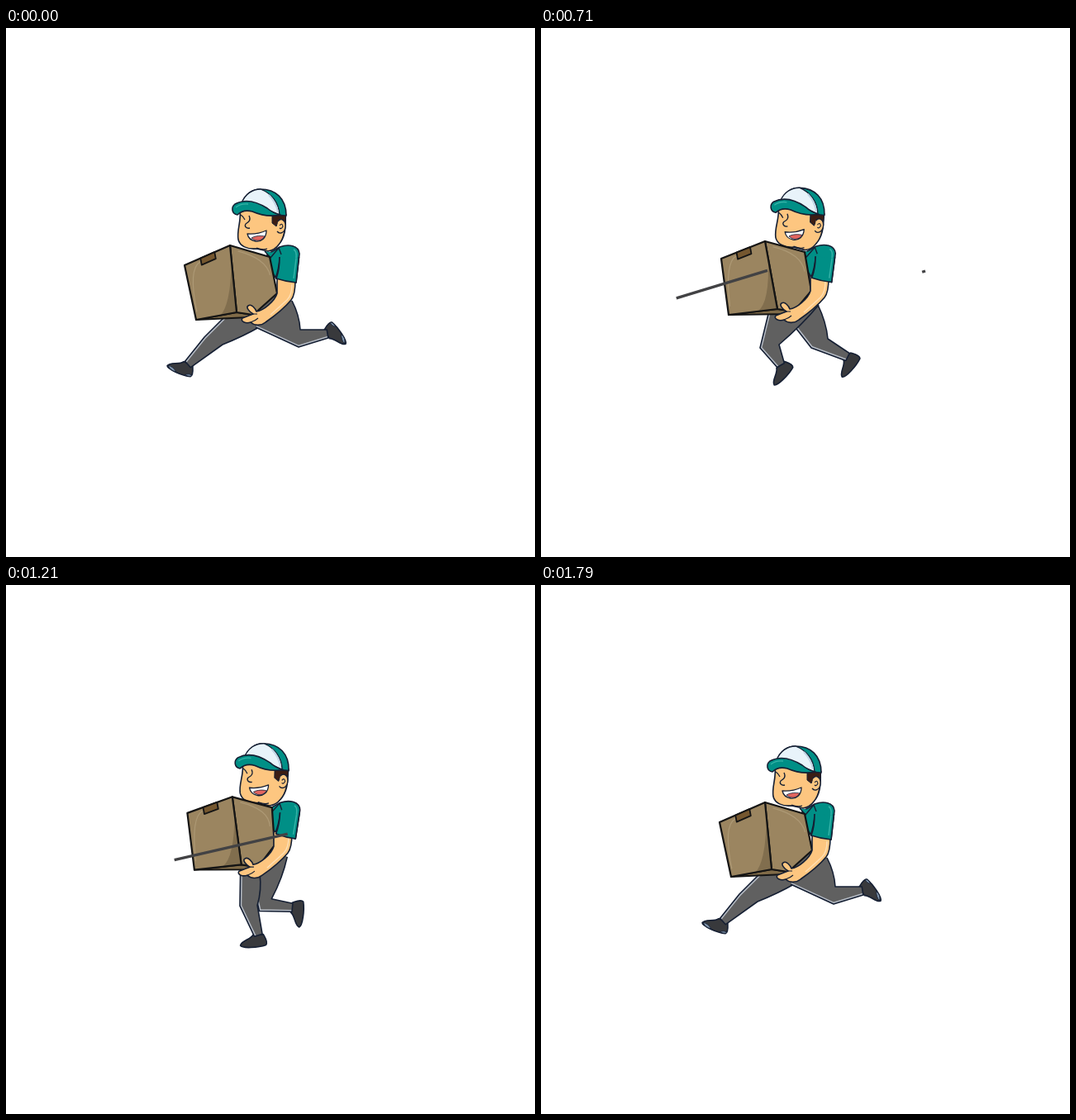
Write an HTML page with a canvas that moves like this. It is 640x640 px and loops after 1.87 s.

```html
<!DOCTYPE html>
<html lang="en">
<head>
<meta charset="utf-8">
<title>Running courier</title>
<style>
html, body { margin: 0; width: 100%; height: 100%; overflow: hidden; background: #fff; }
canvas { display: block; width: 640px; height: 640px; }
</style>
</head>
<body>
<canvas id="stage" width="640" height="640"></canvas>
<script>
const ctx = document.getElementById("stage").getContext("2d");
const LOOP = 1870, FPS = 14, CYCLE = 25;
const INK = "#151f33", BLACK = "#141414", TEAL = "#008f86", SKIN = "#fdc680",
      PANTS = "#606060", SHINE = "#b4bac3", SHOE = "#38393c", CARD = "#9b8560";

// Leg poses: phase, hip front, knee front, ankle, knee back, hip back (x, y each), shoe angle
const stance = [
  [0, 265,349, 240,374, 220,407, 262,383, 306,362, 25],
  [2.5, 278,346, 274,384, 286,421, 295,384, 338,336, 10],
  [4, 281,350, 278,388, 297,424, 299,388, 305,352, 0],
  [7, 295,350, 312,393, 339,417, 329,388, 322,350, -13],
  [7.5, 301,352, 318,387, 361,418, 340,381, 342,324, -8],
  [10, 306,360, 327,387, 371,398, 347,376, 335,335, -46],
];
const swing = [
  [12.5, 302,362, 354,386, 389,370, 356,365, 346,330, -122],
  [15, 309,368, 331,394, 367,369, 340,372, 333,336, -125],
  [16.5, 298,350, 311,395, 353,386, 325,378, 344,326, -92],
  [19.5, 287,350, 291,394, 341,397, 311,380, 343,325, -80],
  [20, 283,350, 284,390, 305,411, 302,388, 308,355, -19],
  [22.5, 275,346, 265,387, 290,408, 288,383, 336,335, -43],
];
const legPoses = [...stance, ...swing];
const farLeg = legPoses.filter(p => p[0] !== 7.5 && p[0] !== 19.5);
const nearLeg = legPoses.filter(p => p[0] !== 7 && p[0] !== 20);

// Box corners: phase, top, left, bottom left, bottom middle, right, bottom right
const boxPoses = [
  [0, 271,263, 216,287, 230,353, 279,344, 319,277, 328,321],
  [4, 268,257, 214,280, 228,347, 281,338, 316,270, 327,317],
  [7, 268,255, 214,278, 227,346, 282,337, 316,268, 326,316],
  [10, 271,258, 218,279, 227,347, 286,340, 319,271, 327,318],
  [12.5, 273,259, 219,279, 228,348, 287,341, 321,272, 327,319],
  [15, 274,258, 220,277, 228,346, 287,340, 322,271, 326,317],
  [20, 273,255, 218,276, 228,344, 281,337, 321,268, 324,313],
];
// Hand: phase, x, y
const handPoses = [[0, 0,0], [4, -1,-5], [7, -2,-6], [10, -2,-3], [15, -3,-3], [20, -5,-7]];

// Speed lines: start point, end point, first step
const speedLines = [
  [170,389, 465,294, 0],
  [137,335, 416,250, 6],
  [107,355, 419,283, 11.55],
];

// Smooth cyclic interpolation through a list of poses
function poseAt(poses, phase) {
  const n = poses.length;
  phase = (phase % CYCLE + CYCLE) % CYCLE;
  let i = n - 1;
  while (poses[i][0] > phase) i--;
  const key = k => poses[(k + n) % n];
  const time = k => key(k)[0] + CYCLE * Math.floor(k / n);
  const span = time(i + 1) - time(i), u = (phase - time(i)) / span;
  const slope = (k, j) => (key(k + 1)[j] - key(k - 1)[j]) / (time(k + 1) - time(k - 1));
  return key(i).map((_, j) => {
    const a = key(i)[j], b = key(i + 1)[j];
    return a + (b - a) * u * u * (3 - 2 * u)
      + span * u * (1 - u) * (slope(i, j) * (1 - u) - slope(i + 1, j) * u);
  }).slice(1);
}

const pairs = list => list.slice(0, list.length & ~1)
  .reduce((out, v, i) => (i % 2 ? out[out.length - 1].push(v) : out.push([v]), out), []);
const mix = (a, b, u) => [a[0] + (b[0] - a[0]) * u, a[1] + (b[1] - a[1]) * u];
const add = (p, x, y) => [p[0] + x, p[1] + y];
const smooth = u => { u = Math.min(1, Math.max(0, u)); return u * u * (3 - 2 * u); };

function paint(path, fill, stroke, width = 1.6) {
  if (typeof path === "string") path = new Path2D(path);
  if (fill) { ctx.fillStyle = fill; ctx.fill(path); }
  if (stroke) { ctx.strokeStyle = stroke; ctx.lineWidth = width; ctx.stroke(path); }
}
const poly = (points, closed = true) => new Path2D("M" + points.join("L") + (closed ? "Z" : ""));

function placed(x, y, angle, px, py, draw) {
  ctx.save();
  ctx.translate(px + x, py + y);
  ctx.rotate(angle);
  ctx.translate(-px, -py);
  draw();
  ctx.restore();
}

function drawLeg(poses, phase) {
  const pose = poseAt(poses, phase), angle = pose[10];
  const [hipF, kneeF, ankle, kneeB, hipB] = pairs(pose.slice(0, 10));
  const knee = mix(kneeF, kneeB, .5);
  const dx = ankle[0] - knee[0], dy = ankle[1] - knee[1], k = 5 / Math.hypot(dx, dy);
  const ankleF = add(ankle, -dy * k, dx * k), ankleB = add(ankle, dy * k, -dx * k);
  const bulge = add(mix(kneeB, hipB, .5), 4, 0);

  placed(ankle[0], ankle[1], angle * Math.PI / 180, 0, 0, () => {
    paint("M-6-1C-9 5-21 6-22 12C-20 16 0 15 9 12C12 9 8 3 6-1Z", SHOE, INK);
    if (Math.abs(phase % CYCLE) < 1.5 || angle < -100)
      paint("M-21 11Q-15 10-9 14Q-17 16-21 11ZM2 13Q6 9 10 10Q9 13 2 13Z", "#8296ad", INK, .8);
  });
  const edge = `M${hipF}L${kneeF}L${ankleF}L${ankleB}L${kneeB}Q${bulge} ${hipB}`;
  const body = new Path2D(edge + "L322,318Z");
  paint(body, PANTS);
  ctx.save();
  ctx.clip(body);
  paint(poly([hipF, kneeF, ankleF], false), null, SHINE, 4.6);
  ctx.restore();
  paint(edge, null, INK);
}

function drawTorso() {
  paint("M316 274L331 265C342 261 354 263 355 273L351 308L327 303L318 290Z", TEAL, INK);
  paint("M331 277Q330 292 326 302", null, INK, 1.3);
  paint("M348 268Q352 270 351 278L348 303", null, "#35b3a8", 1.5);
  paint("M313 270L320 278L330 266L333 274", TEAL, INK, 1.4);
}

function drawHead() {
  paint("M283 219C285 235 279 243 281 256C283 264 292 268 303 267L317 270Q325 269 330 262C337 254 339 243 338 225Z", SKIN, INK);
  paint("M322 226L339 225L338 234L330 232L327 240L322 236Z", "#3c1d14", INK, 1);
  paint("M329 234C333 229 339 233 338 241C337 248 331 250 328 246", SKIN, INK, 1.3);
  paint("M331 239Q334 235 335 240Q333 244 331 242", null, INK, 1.1);
  paint("M294 227C297 233 293 235 290 237C288 240 291 243 295 242M284 226Q287 228 289 232", null, INK, 1.3);
  paint("M292 249Q304 250 315 245C315 254 309 259 302 258C296 257 293 254 292 249Z", "#fff", INK, 1.3);
  paint("M297 254C302 251 309 251 313 252C309 258 303 259 297 254Z", "#e2655f", INK, .8);
  paint("M303 266Q311 269 316 267", null, INK, 1.2);
  paint("M285 213C289 201 298 195 308 195C326 195 339 206 339 227L325 226Z", TEAL, INK);
  paint("M285 212C289 201 298 195 308 195C321 200 330 211 331 226L310 217Z", "#e8f3fa", INK, 1.3);
  paint("M318 202Q327 211 329 223", null, "#bfd5e5", 2);
  paint("M280 226C273 225 272 217 277 213C290 206 305 211 316 218Q323 224 332 226C318 229 307 226 298 222Q287 219 280 226Z", TEAL, INK);
  paint("M278 217Q284 212 293 213", null, "#35b3a8", 1.3);
}

function drawBox(phase) {
  const [top, left, low, mid, right, lowR] = pairs(poseAt(boxPoses, phase));
  const under = add(mid, 20, 3);
  paint(poly([low, mid, under, add(mid, 15, 6)]), "#806b48", BLACK, 2);
  paint(poly([top, right, lowR, under, mid]), CARD, BLACK, 2.2);
  const face = poly([top, left, low, mid]);
  paint(face, CARD);
  const fold = mix(top, mid, .8);
  paint(`M${top}L${mid}L${mix(mid, low, .4)}Q${add(fold, -6, 8)} ${mix(top, mid, .25)}Z`, "#816e4e");
  paint(`M${add(mix(left, low, .85), 3, 0)}Q${add(left, 4, 4)} ${add(mix(left, top, .35), 0, 4)}`, null, "#ad9975", 1.2);
  paint(`M${add(mix(top, right, .2), 0, 4)}Q${add(right, -4, 2)} ${add(mix(right, lowR, .5), -4, 0)}`, null, "#ad9975", 1.2);
  paint(face, null, BLACK, 2.2);
  const tapeL = mix(left, top, .35), tapeR = mix(left, top, .66);
  paint(poly([tapeL, tapeR, add(tapeR, 1.5, 8), add(tapeL, 1.5, 8)]), "#75572f", BLACK, 1.8);
}

function drawArm() {
  paint("M328 303L350 305C350 316 349 324 345 329C335 341 324 349 314 356C308 361 300 360 296 356C290 358 283 355 286 351C291 349 296 347 299 346C294 343 290 338 293 336C297 333 302 340 303 343C311 342 325 331 328 321Z", SKIN, INK);
  paint("M296 356Q302 354 305 351M299 346L304 346", null, INK, 1.1);
  paint("M346 310Q346 323 340 329L320 347", null, "#ffe0b5", 1.4);
}

function drawSpeedLines(step) {
  for (const [x1, y1, x2, y2, start] of speedLines) {
    const head = smooth((step - start) / 8.1), tail = smooth((step - start - 2.45) / 8.1);
    if (head > tail)
      paint(poly([mix([x1, y1], [x2, y2], tail), mix([x1, y1], [x2, y2], head)], false), null, "#424244", 3.4);
  }
}

function render(now) {
  const step = Math.min(CYCLE, Math.floor((now % LOOP + 5) * FPS / 1000));
  const turn = step / CYCLE * 2 * Math.PI;
  const sway = (1 - Math.cos(turn)) / 2, bob = (1 - Math.cos(2 * turn)) / 2;
  const [handX, handY] = poseAt(handPoses, step);

  ctx.clearRect(0, 0, 640, 640);
  ctx.lineJoin = "round";
  drawLeg(farLeg, step);
  drawLeg(nearLeg, step + CYCLE / 2);
  const torso = draw => placed(sway * 1.5, -bob * 2, bob * .05, 335, 265, draw);
  torso(drawTorso);
  placed(sway * 3, -bob * 3.6, sway * .04, 320, 260, drawHead);
  drawBox(step);
  placed(handX, handY, 0, 0, 0, drawArm);
  // The sleeve hem overlaps the arm
  torso(() => {
    paint("M331 277L354 279L351 308Q339 307 327 303Q331 292 331 277Z", TEAL);
    paint("M331 277Q331 292 327 303Q339 307 351 308L354.5 277", null, INK);
    paint("M351 279L348 303", null, "#35b3a8", 1.5);
  });
  drawSpeedLines(step);
}

function tick() {
  render(performance.now());
  requestAnimationFrame(tick);
}
tick();
</script>
</body>
</html>
```
